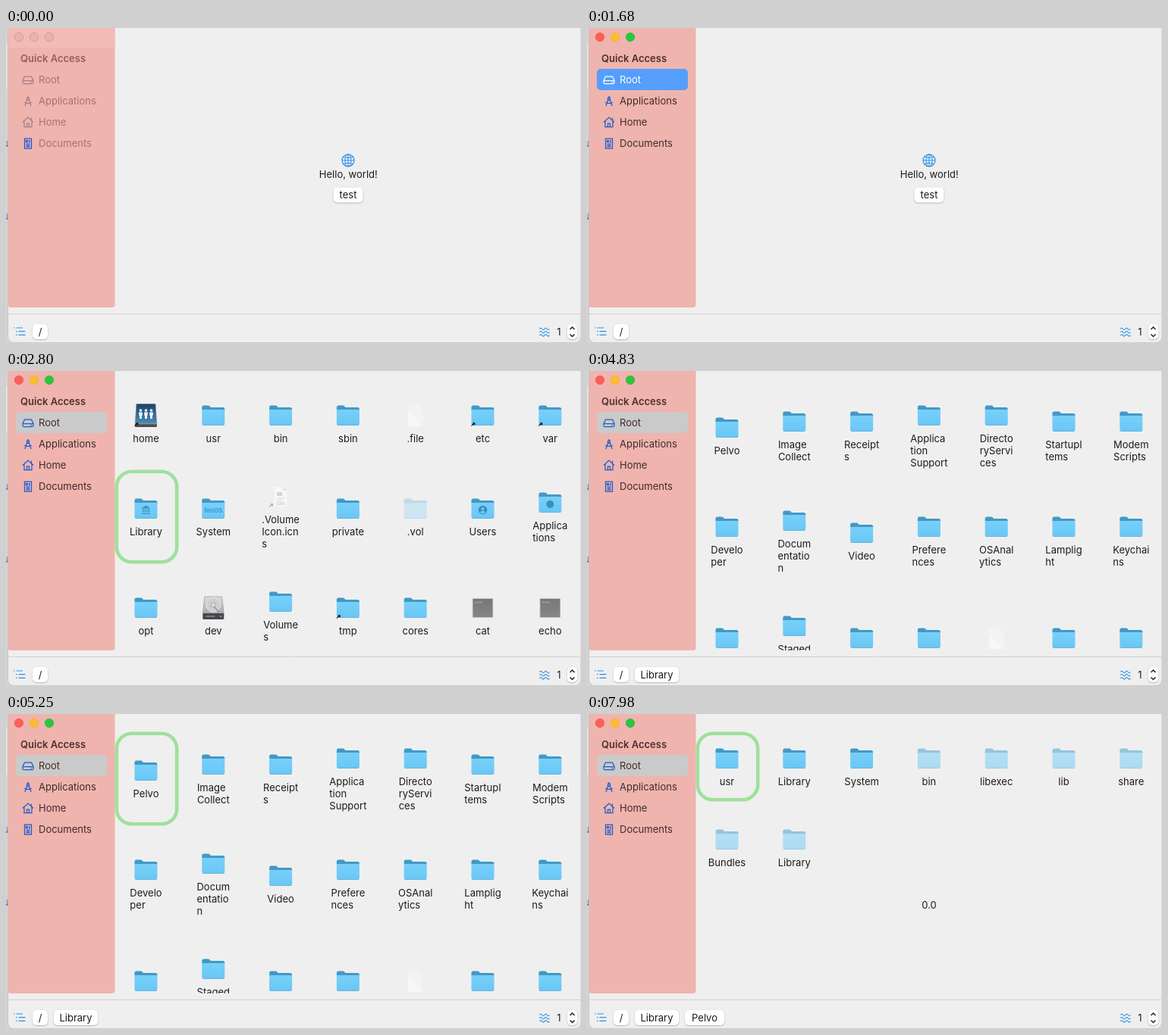
An HTML page with a canvas that plays this animation: 758 px wide and 416 px high, repeating every 8000 ms.

```html
<!DOCTYPE html>
<html lang="en">
<head>
<meta charset="utf-8">
<title>File browser</title>
<style>
  html, body { margin: 0; width: 100%; height: 100%; overflow: hidden; background: #efefef; }
  canvas { display: block; width: 758px; height: 416px; }
</style>
</head>
<body>
<canvas id="stage" width="758" height="416"></canvas>
<script>
const ctx = document.getElementById('stage').getContext('2d');
const LOOP = 8000;
const FONT = 'Inter, "Liberation Sans", sans-serif';
const BLUE = '#2f8fe8', ICON_BLUE = '#1f5bd0', BG = '#efefef';

// Each entry is "label|kind flags"; "~" breaks a label, "dim" and "faint" fade an icon, "alias" adds an arrow.
const VIEWS = {
  root: ['home|server alias', 'usr', 'bin', 'sbin', '.file|page', 'etc|folder alias', 'var|folder alias',
    'Library|folder columns', 'System|folder label', '.Volume~Icon.icn~s|image alias', 'private',
    '.vol|folder faint', 'Users|folder person', 'Applica~tions|folder disc',
    'opt', 'dev|disk', 'Volume~s', 'tmp|folder alias', 'cores', 'cat|exec', 'echo|exec'],
  library: ['Pelvo', 'Image~Collect', 'Receipt~s', 'Applica~tion~Support', 'Directo~ryServi~ces',
    'StartupI~tems', 'Modem~Scripts', 'Develo~per', 'Docum~entatio~n', 'Video', 'Prefere~nces',
    'OSAnal~ytics', 'Lamplig~ht', 'Keychai~ns', 'Fonts', 'Staged~Exten~sions', 'Logs', 'Caches',
    'notes|page', 'Sounds', 'Colors'],
  vendor: ['usr', 'Library', 'System', 'bin|folder dim', 'libexec|folder dim', 'lib|folder dim',
    'share|folder dim', 'Bundles|folder dim', 'Library|folder dim'],
};
const VIEW_STEPS = [[0, 'hello'], [1890, 'root'], [4830, 'library'], [7420, 'vendor']];
const HOVER_STEPS = [[0, -1], [2170, 0], [2520, 1], [2730, -1], [2800, 7], [4830, -1],
  [5180, 7], [5250, 0], [7420, -1], [7980, 0]];
const COUNTER_STEPS = [[0, 283], [7490, 275], [7560, 268], [7980, 252]];
const CRUMBS = [['/', 35, 20], ['Library', 63, 58], ['Pelvo', 129, 52]];

const at = (steps, t) => steps.filter(s => s[0] <= t).pop()[1];

function box(x, y, w, h, r, fill, stroke, width = 1) {
  ctx.beginPath();
  ctx.roundRect(x, y, w, h, r);
  if (fill) { ctx.fillStyle = fill; ctx.fill(); }
  if (stroke) { ctx.strokeStyle = stroke; ctx.lineWidth = width; ctx.stroke(); }
}

function circle(x, y, r, fill, stroke, width = 1) {
  ctx.beginPath();
  ctx.arc(x, y, r, 0, Math.PI * 2);
  if (fill) { ctx.fillStyle = fill; ctx.fill(); }
  if (stroke) { ctx.strokeStyle = stroke; ctx.lineWidth = width; ctx.stroke(); }
}

function path(d, stroke, width = 1.2, fill) {
  const p = new Path2D(d);
  if (fill) { ctx.fillStyle = fill; ctx.fill(p); }
  if (stroke) { ctx.strokeStyle = stroke; ctx.lineWidth = width; ctx.stroke(p); }
}

function text(str, x, y, color = '#1c1c1c', align = 'center', size = 13, weight = 400) {
  ctx.font = `${weight} ${size}px ${FONT}`;
  ctx.textAlign = align;
  ctx.fillStyle = color;
  ctx.fillText(str, x, y + size * 0.36);
}

function gradient(y0, y1, a, b) {
  const g = ctx.createLinearGradient(0, y0, 0, y1);
  g.addColorStop(0, a);
  g.addColorStop(1, b);
  return g;
}

function placed(x, y, draw, alpha = 1) {
  ctx.save();
  ctx.translate(x, y);
  ctx.globalAlpha *= alpha;
  draw();
  ctx.restore();
}

function button(label, x, y, w, h) {
  ctx.save();
  ctx.shadowColor = 'rgba(0,0,0,.28)';
  ctx.shadowBlur = 2;
  ctx.shadowOffsetY = 0.7;
  box(x, y, w, h, 5, '#fff');
  ctx.restore();
  if (label) text(label, x + w / 2, y + h / 2);
}

// File icons, drawn around their own centre.
function folder(flags) {
  path('M-15-11Q-15-13.5-12.5-13.5H-7Q-5.5-13.5-4.5-12.3L-3.5-11H12.5Q15-11 15-8.5V-7.5H-15Z', null, 1, '#3f9ac8');
  box(-15, -7.5, 30, 20.3, [0, 0, 2, 2], gradient(-8, 13, '#76d0fb', '#69c6f4'));
  path('M-14 12.5H14', '#56a9d2', 0.7);
  const mark = '#3790c0';
  if (flags.includes('columns')) {
    path('M-5-1L0-4L5-1Z', mark, 0.8, mark);
    path('M-4 0V5M-1.3 0V5M1.3 0V5M4 0V5M-5.5 6.5H5.5', mark, 1.2);
  }
  if (flags.includes('label')) text('fenOS', 0, 2, mark, 'center', 8, 600);
  if (flags.includes('person')) {
    circle(0, 1.5, 5.7, mark);
    circle(0, -0.2, 1.9, '#72ccf8');
    path('M-3.6 5Q0 0 3.6 5Q0 7.3-3.6 5Z', null, 1, '#72ccf8');
  }
  if (flags.includes('disc')) circle(0, 2, 5, mark);
}

function server() {
  path('M-12.5-15.5H12.5L14.2 11H-14.2Z', '#7c868e', 0.8, gradient(-15, 11, '#1b4269', '#4a8fbd'));
  box(-14.5, 10.5, 29, 4.5, 1.5, '#4a4d50');
  path('M-14 10.8H14', '#aeb6bc', 0.8);
  for (const x of [-7, 0, 7]) {
    circle(x, -7, 1.8, '#fff');
    path(`M${x - 2.5}-4.5H${x + 2.5}L${x + 2} 0H${x + 1.5}V4H${x - 1.5}V0H${x - 2}Z`, null, 1, '#eef6fb');
  }
}

function disk() {
  path('M-11.5-15H11.5L14 8H-14Z', '#a0a2a4', 0.8, gradient(-15, 8, '#dadbdc', '#a6a8aa'));
  circle(0, -4, 9.3, '#cdcecf', '#ececec', 0.8);
  circle(0, -4, 3, '#dedfdf', '#95979a', 0.7);
  path('M7 5L1-2', '#7d7f82', 1.1);
  box(-14, 7, 28, 8, 1.5, '#45474a');
  path('M-10 11H2', '#76797c', 2);
  circle(10, 11, 1, '#aeb1b3');
}

function page() {
  path('M-10-14H4L10-8V14H-10Z', null, 1, 'rgba(255,255,255,.25)');
  path('M-10-6L9 14H-10Z', null, 1, 'rgba(255,255,255,.35)');
}

function image() {
  path('M-8-13H3L8-8V13H-8Z', null, 1, '#f7f7f7');
  path('M3-13V-8H8Z', null, 1, '#e3e3e3');
  box(-5, -6, 7, 5, 1, '#cfd5da');
  path('M-5 2H5M-5 5H3', '#d2d4d6', 1);
  text('ICNS', 0, 9.5, '#b5b5b5', 'center', 5);
}

function exec() {
  box(-13.7, -12.8, 27.4, 25.6, 1, '#b9b9b9');
  box(-12.8, -11.9, 25.6, 23.8, 0.5, gradient(-12, 12, '#777', '#868686'));
  text('exec', -10.5, -7.5, '#8fd28d', 'left', 5);
}

const KINDS = { folder, server, disk, page, image, exec };

function fileIcon(flags, x, y) {
  const alpha = flags.includes('dim') ? 0.5 : flags.includes('faint') ? 0.26 : 1;
  placed(x, y, () => KINDS[flags[0]](flags), alpha);
  if (flags.includes('alias')) {
    const color = flags[0] === 'image' ? '#aaa' : '#111';
    placed(x - 14.5, y + 12.5, () => path('M-1 2Q-.5-1 2-2L1-3.5L4.5-3L4 .8L3-1Q1 0-1 2Z', null, 1, color));
  }
}

function fileGrid(entries, hover) {
  const items = entries.map(e => {
    const [name, flags = 'folder'] = e.split('|');
    return { lines: name.split('~'), flags: flags.split(' ') };
  });
  ctx.save();
  ctx.beginPath();
  ctx.rect(143, 0, 615, 369);
  ctx.clip();
  let top = 24;
  for (let start = 0; start < items.length; start += 7) {
    const row = items.slice(start, start + 7);
    const height = 75 + 16 * Math.max(...row.map(i => i.lines.length));
    const middle = top + height / 2;
    row.forEach((item, col) => {
      const x = 184.5 + col * 88.8;
      const shift = 8 * (item.lines.length - 1);
      fileIcon(item.flags, x, middle - 10.5 - shift);
      ctx.font = `400 13px ${FONT}`;
      const left = x - Math.max(...item.lines.map(l => ctx.measureText(l).width)) / 2;
      item.lines.forEach((line, i) => text(line, left, middle + 19.7 - shift + i * 16, '#1c1c1c', 'left'));
      if (start + col === hover) box(x - 38.7, top + 1.8, 79.4, height - 3.6, 20, null, '#9fe09c', 4.6);
    });
    top += height + 16;
  }
  ctx.restore();
}

function hello() {
  placed(451, 174.8, () => {
    circle(0, 0, 8, null, BLUE, 1.2);
    path('M0-8V8M-8 0H8M-6.5-4.5Q0-2.2 6.5-4.5M-6.5 4.5Q0 2.2 6.5 4.5', BLUE, 1);
    ctx.beginPath();
    ctx.ellipse(0, 0, 4, 8, 0, 0, Math.PI * 2);
    ctx.stroke();
  });
  text('Hello, world!', 451.3, 193);
  button('test', 431.5, 210.5, 39, 20);
}

// Sidebar icons share a 16 px square centred on the origin.
const SIDE_ITEMS = [
  ['Root', 'M-4.5-4.5H4.5L7 1V3.5Q7 5 5.5 5H-5.5Q-7 5-7 3.5V1ZM-7 1H7M3.5 3H5'],
  ['Applications', 'M0-6.5V-4M-.8-3.5L-4 6.5M.8-3.5L4 6.5M-5 1.8Q0 4 5 1.8M-1.4-3A1.5 1.5 0 1 1 1.4-3A1.5 1.5 0 1 1-1.4-3'],
  ['Home', 'M-7 0L0-6.5L7 0M-5-1.5V6H5V-1.5M-1.5 6V1.5H1.5V6M4.5-3V-6'],
  ['Documents', 'M-4.5-6.5H4.5V6.5H-4.5ZM-2.5-4H-.5V-2H-2.5ZM1-3.8H3M1-2H3M-2.5 .5H2.5M-2.5 2.5H2.5M-2.5 4.4H2.5'],
];

function sidebar(t) {
  const active = t >= 840;
  box(3, 0, 140.5, 369, [0, 0, 4, 3], '#efb4ae');
  if (!active) box(3, 0, 140.5, 26, 0, '#f2bbb5');
  const lights = active ? ['#fb5f57', '#fdbc2e', '#2ac63f'] : Array(3).fill('#e8b2ad');
  const rims = active ? ['#ee544c', '#efae2b', '#25b838'] : Array(3).fill('#c9938e');
  lights.forEach((c, i) => circle(17 + i * 20, 12, 5.7, c, rims[i], 0.7));
  text('Quick Access', 19, 40.5, active ? '#4c3130' : '#925f5d', 'left', 13, 600);

  const chosen = t >= 1680, focused = t < 1890;
  if (chosen) box(13, 54, 120, 28, 5, focused ? '#559efb' : '#cacaca');
  SIDE_ITEMS.forEach(([name, icon], i) => {
    const y = 68.5 + i * 28, white = chosen && focused && i === 0;
    let iconColor = active ? ICON_BLUE : '#a77f86';
    if (!active && i === 3) iconColor = '#1b57d5';
    placed(29, y, () => path(icon, white ? '#fff' : iconColor, 1.25));
    text(name, 43, y, white ? '#fff' : active ? '#402b2a' : '#a47370', 'left');
  });
}

function statusBar(crumbCount) {
  path('M3 377.5H758', '#d0d0d0', 1);
  path('M10 396H11.5M13.5 396H22M13 400.7H14.5M16.5 400.7H25.5M13 405.4H14.5M16.5 405.4H25.5', BLUE, 1.2);
  CRUMBS.slice(0, crumbCount).forEach(([label, x, w]) => button(label, x, 391, w, 20));
  for (const y of [397.5, 401.7, 405.9]) {
    path(`M703.3 ${y}q1.65-2.4 3.3 0t3.3 0t3.3 0t3.3 0`, BLUE, 1.1);
  }
  text('1', 729, 401.5);
  button('', 740, 391, 13, 20);
  path('M743.5 398L746.5 395L749.5 398M743.5 404.5L746.5 407.5L749.5 404.5', '#222', 1.5);
}

function windowFrame() {
  ctx.fillStyle = '#d5d5d5';
  ctx.fillRect(0, 0, 758, 416);
  box(0, 20, 2, 60, 0, '#e2e2e2');
  text('u', -4, 152, '#1d3f9c', 'left');
  text('u', -4, 248, '#1d3f9c', 'left');
  box(2.5, -10, 755.5, 425.7, [0, 0, 8, 8], BG, '#bbb', 0.8);
}

function render(t) {
  const view = at(VIEW_STEPS, t);
  windowFrame();
  if (view === 'hello') hello();
  else fileGrid(VIEWS[view], at(HOVER_STEPS, t));
  if (view === 'vendor') text('0.0', 451, at(COUNTER_STEPS, t));
  sidebar(t);
  statusBar({ library: 2, vendor: 3 }[view] || 1);
}

const began = performance.now();
function tick() {
  render((performance.now() - began) % LOOP);
  requestAnimationFrame(tick);
}
tick();
</script>
</body>
</html>
```
